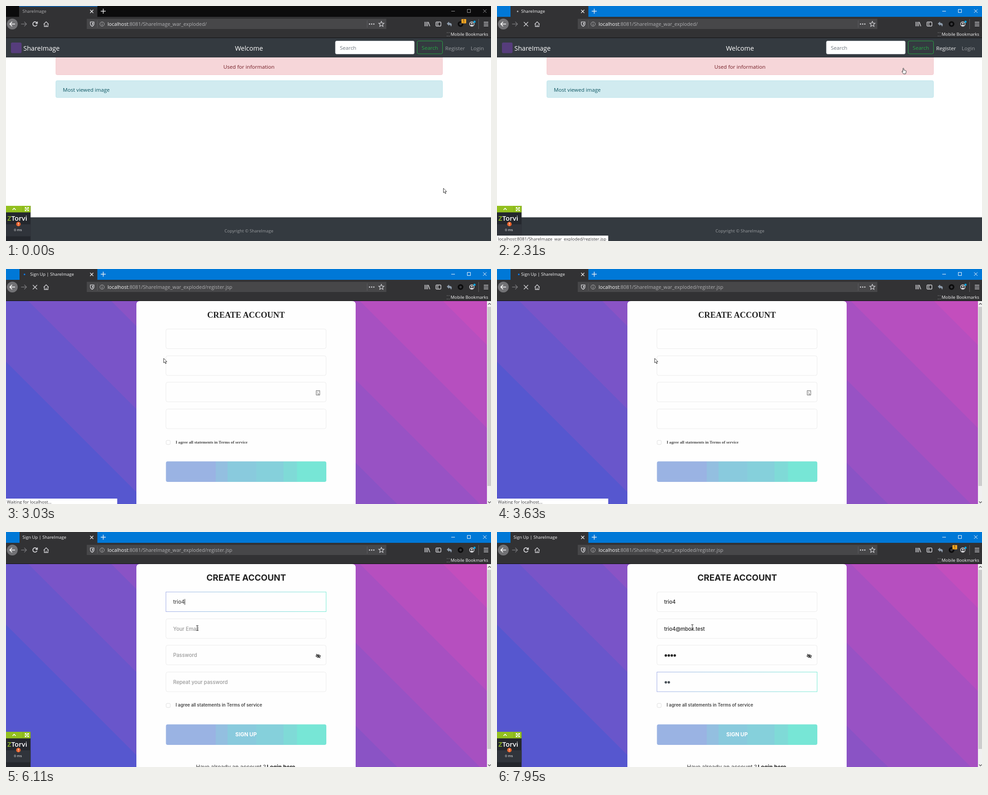
An HTML page that plays this animation: 1075 px wide and 521 px high, repeating every 8000 ms.

```html
<!DOCTYPE html>
<html lang="en">
<head>
<meta charset="utf-8">
<title>Sign-up walkthrough</title>
<style>
html, body { margin: 0; width: 100%; height: 100%; overflow: hidden; background: #fff; }
svg { display: block; }
text { font-family: "Open Sans", "Noto Sans", sans-serif; font-size: 11.6px; white-space: pre; }
.ui { font-size: 9.55px; fill: #f9f9fa; }
.url { font-size: 11px; fill: #b1b1b3; }
.brand { font-size: 14.5px; fill: #fff; }
.link { fill: #9a9da0; }
.lit { fill: #d0d2d3; }
.mid { text-anchor: middle; }
.line { fill: none; stroke: #d7d7db; stroke-width: 1.4; }
.form text { font-family: Inter, sans-serif; font-weight: 500; font-size: 11.3px; fill: #222; }
.form .hint { fill: #999; }
.form .title { font-weight: 700; font-size: 19px; }
.form .terms { font-weight: 600; font-size: 9.7px; fill: #444; }
.form .foot { font-size: 12.3px; fill: #555; }
.form .bold { font-weight: 700; fill: #222; }
.form .go { font-weight: 700; font-size: 11.7px; fill: #fff; }
.plain text { font-family: "Liberation Serif", serif; font-weight: 700; fill: #222; }
</style>
</head>
<body>
<svg width="1075" height="521" viewBox="0 0 1075 521">
  <defs>
    <linearGradient id="sky" gradientUnits="userSpaceOnUse" x1="0" y1="205" x2="551" y2="-346"></linearGradient>
    <linearGradient id="mint" gradientUnits="userSpaceOnUse" x1="355" y1="0" x2="710" y2="0"></linearGradient>
    <linearGradient id="glow" gradientUnits="userSpaceOnUse" x1="355" y1="0" x2="710" y2="0">
      <stop offset="0" stop-color="#9face6"/><stop offset="1" stop-color="#74ebd5"/>
    </linearGradient>
  </defs>

  <!-- Home page -->
  <g data-on="0 3030">
    <rect y="71" width="1075" height="450" fill="#fff"/>
    <rect x="110.5" y="100" width="857" height="52.5" rx="3" fill="#f6d6d9" stroke="#f3cacf"/>
    <rect x="110.5" y="165.5" width="857" height="37.5" rx="3" fill="#d1ebf0" stroke="#bee5eb"/>
    <rect y="71" width="1075" height="43" fill="#343a40"/>
    <rect y="468.5" width="1075" height="53" fill="#343a40"/>
    <rect x="11" y="81" width="23.5" height="23.5" rx="3" fill="#563d7c"/>
    <text class="brand" x="38.5" y="99">ShareImage</text>
    <text class="brand mid" x="538.5" y="99">Welcome</text>
    <rect x="730" y="77.5" width="175" height="29" rx="3" fill="#fff" stroke="#ced4da" stroke-width=".8"/>
    <text x="740" y="97" fill="#6c757d">Search</text>
    <rect x="911.5" y="77.5" width="56" height="28.5" rx="3" fill="none" stroke="#28a745"/>
    <text class="mid" x="939.5" y="97" fill="#28a745">Search</text>
    <text class="link" x="973.5" y="98">Register</text>
    <text class="link" x="1030" y="98">Login</text>
    <text class="lit" x="1030" y="98" data-on="850 1610">Login</text>
    <text class="lit" x="973.5" y="98" data-on="1690 2410">Register</text>
    <text class="mid" x="538.5" y="139" fill="#721c24">Used for information</text>
    <text x="126" y="190" fill="#0c5460">Most viewed image</text>
    <text class="mid" x="538.5" y="502" fill="#9a9da0" style="font-size:9.5px">Copyright © ShareImage</text>
  </g>

  <!-- Sign-up page -->
  <g data-on="3030 8000">
    <rect y="71" width="1066" height="450" fill="url(#sky)"/>
    <path d="M289 521V79q0-8 8-8H767q8 0 8 8V521z" fill="#fefefe"/>
    <rect x="1066" y="71" width="9" height="450" fill="#f0f0f0"/>
    <rect x="1067" y="84" width="8" height="397" fill="#cdcdcd"/>
    <path class="line" d="M1068.5 79l3-3 3 3M1068.5 515.500l3 3 3-3" style="stroke:#555"/>
    <rect x="354.500" y="426.500" width="355.500" height="45.500" rx="4" fill="url(#mint)"/>
    <rect x="355" y="380" width="9" height="9" rx="2" fill="#fff" stroke="#ddd"/>
    <g class="form" id="form"></g>
    <g class="plain" data-on="3030 3930">
      <text class="mid" x="532" y="108" style="font-size:18.4px">CREATE ACCOUNT</text>
      <text x="376" y="386.500" style="font-size:9.2px;fill:#444">I agree all statements in Terms of service</text>
      <path d="M687.500 269.500h8v10h-8zM689.500 272h1.500M692.500 272h1.500M689.500 274h1.500M689.500 277h2M692.500 275.500v2.500h1.500" fill="none" stroke="#666"/>
    </g>
    <g class="form" data-on="3930 8000">
      <text class="title mid" x="532.500" y="108">CREATE ACCOUNT</text>
      <text class="terms" x="376" y="387">I agree all statements in Terms of service</text>
      <text class="go mid" x="532" y="453">SIGN UP</text>
      <text class="foot" x="421" y="525">Have already an account ?</text>
      <text class="foot bold" x="578" y="525">Login here</text>
      <path d="M687 275q5-5.500 10 0q-5 5.500-10 0z" fill="none" stroke="#222" stroke-width="1.300"/>
      <circle cx="692" cy="275" r="1.700" fill="#222"/>
      <path d="M687.500 270.500l9 9" stroke="#222" stroke-width="1.300"/>
    </g>
  </g>

  <!-- Profiler widget -->
  <g data-on="0 3030 4030 8000">
    <rect y="443" width="54.500" height="78" fill="#24272d"/>
    <rect y="443" width="54.500" height="14.500" fill="#93c01f"/>
    <rect y="484" width="54.500" height="26.500" fill="#30343b"/>
    <path d="M37.500 443v14.500" stroke="#7ea51a"/>
    <text class="mid" x="26.500" y="499" fill="#fff" style="font-size:7.8px">0 ms</text>
    <text class="mid" x="18" y="456" fill="#fff" style="font-size:10.500px;font-weight:700" data-on="4030 4230">X</text>
    <g data-on="0 3030 4230 8000">
      <path d="M14.500 452l3.500-3.500 3.500 3.500" fill="none" stroke="#fff" stroke-width="1.600"/>
      <path d="M43 447l6.500 6.500M49.500 447l-6.500 6.500M42.500 449.500v-3h3M47 446.500h3v3M50 451v3h-3M45.500 454h-3v-3" fill="none" stroke="#fff" stroke-width="1.200"/>
      <text x="3" y="476" fill="#fff" style="font-size:15px;font-weight:600"><tspan fill="#93c01f">Z</tspan>Torvi</text>
      <circle cx="27.500" cy="483.500" r="5" fill="#e8622c"/>
      <path d="M27.500 480.500v3.500M27.500 485.300v1.300" stroke="#fff" stroke-width="1.300"/>
    </g>
  </g>

  <!-- Status line -->
  <g data-on="1070 1610 1690 3930">
    <rect y="509" width="246.500" height="12" fill="#fff"/>
    <text class="ui" x="2" y="520" style="fill:#333" id="status"></text>
  </g>

  <!-- Browser frame -->
  <rect width="1075" height="24" fill="#0b0b0c"/>
  <rect width="1075" height="24" fill="#0078d7" data-on="1990 8000"/>
  <rect y="24" width="1075" height="47" fill="#323234"/>
  <rect y="70" width="1075" height="1" fill="#0f0f10"/>
  <rect x="29" width="173.500" height="24.500" fill="#323234"/>
  <rect x="29" width="173.500" height="1.500" fill="#0a6cc8" data-on="0 1990"/>
  <rect x="29" width="1" height="24" fill="#0078d7" data-on="1990 8000"/>
  <text class="ui" id="tab" y="15"></text>
  <circle id="spin" cy="12" r="1.700"/>
  <path class="line" d="M186.500 8.500l7 7M193.500 8.500l-7 7M215.500 6v11M210 11.500h11" style="stroke:#f0f0f2"/>
  <path id="winbtn" fill="none" d="M987 11.500h8M1022.500 7.500h7v7h-7zM1057.500 7.500l7.500 7.500M1065 7.500l-7.500 7.500"/>
  <circle cx="14" cy="40" r="12" fill="#727275"/>
  <path class="line" d="M20 40H9M13.500 35L8.500 40l5 5" style="stroke:#fff;stroke-width:1.700"/>
  <path class="line" d="M33.500 40h11M40.500 35l5 5-5 5" style="stroke:#77777a"/>
  <path class="line" d="M68.500 37.500a4.800 4.800 0 1 0 .3 4M69.500 34.500v4h-4" data-on="0 2090 4830 8000" style="stroke-width:1.800"/>
  <path class="line" id="stop" d="M59.500 35.500l9.500 9.500M69 35.500l-9.500 9.500" data-on="2090 4830"/>
  <path class="line" d="M83.500 40.500l5.500-5.500 5.500 5.500M85 39.500v6h8v-6M89 45.500v-4"/>
  <rect x="179" y="28.500" width="664" height="22.500" fill="#474749"/>
  <path d="M202.500 32v16M800.500 32v16M1047.500 29v22" stroke="#5e5e61"/>
  <path class="line" d="M187 35.500q4 0 4-1 0 1 4 1v4q0 3.500-4 5.500-4-2-4-5.500z"/>
  <path d="M191 37v6q2-1.500 2-3.500V37z" fill="#d7d7db"/>
  <circle class="line" cx="213" cy="40" r="4.800" style="stroke-width:1;stroke:#b1b1b3"/>
  <path d="M213 37v1.300M213 39.500v3.500" stroke="#b1b1b3" stroke-width="1.200"/>
  <text class="url" x="225" y="44"><tspan fill="#f9f9fa">localhost</tspan>:8081/ShareImage_war_exploded/<tspan data-on="3030 8000">register.jsp</tspan></text>
  <path d="M804.500 40h2.500M809.300 40h2.500M814 40h2.500" stroke="#d7d7db" stroke-width="2.500"/>
  <path class="line" d="M832 34l1.700 3.900 4.200.4-3.200 2.800 1 4.200-3.700-2.200-3.700 2.200 1-4.200-3.200-2.800 4.200-.4z" style="stroke-width:1.200"/>
  <path class="line" d="M928.500 35v10M931.500 35v10M934.500 35v10M936 35.500l3.500 9.500"/>
  <rect class="line" x="953" y="35.500" width="11" height="9" rx="1.500"/>
  <path class="line" d="M957.500 36v8.500M954.500 38.500h2M954.500 41h2" style="stroke-width:1"/>
  <path d="M977 39l5-4.500v2.700q6 .3 6 4.300 0 2-2 4.500.5-4-4-4.200v2.200z" fill="#8d9bab"/>
  <circle cx="1007.500" cy="40" r="4.500" fill="#37373a" stroke="#0b0b0c" stroke-width="3.500"/>
  <g data-on="0 2090 7700 8000">
    <rect x="1009.500" y="29" width="10.500" height="9.500" rx="1" fill="#f5a623"/>
    <text class="mid" x="1014.700" y="37" fill="#111" style="font-size:8.500px">1</text>
  </g>
  <circle class="line" cx="1032.500" cy="40" r="5"/>
  <circle cx="1032.500" cy="38.500" r="1.800" fill="#d7d7db"/>
  <path d="M1029 43q3.500-3.500 7 0-3.500 3-7 0z" fill="#d7d7db"/>
  <circle cx="1038.500" cy="35" r="2.400" fill="#00a8e8"/>
  <path class="line" d="M1059 36h10M1059 40h10M1059 44h10"/>
  <path d="M977 59h2M981 59h2M977 66.500h2M981 66.500h2" stroke="#8a8a8d"/>
  <text class="ui" x="985.500" y="65.500">Mobile Bookmarks</text>

  <!-- Pointer -->
  <g id="pointer" stroke-linejoin="round">
    <path data-on="0 850 2410 3930" d="M0 0V10L2.300 8 4 12 5.700 11.200 4 7.500H7.200z" fill="#fff" stroke="#222" stroke-width=".9"/>
    <path data-on="850 2410" d="M2.700 1.300q1-1.300 2 0V5l4 1q1.500.5 1.300 2.300L9.300 11l-.5 2.500H4L1 9.300Q0 7.500 1.300 7.200l1.400 1.300z" fill="#fff" stroke="#222" stroke-width=".9"/>
    <path data-on="3930 8000" d="M-2.500-5.500H2.500M0-5.500V5.500M-2.500 5.500H2.500" fill="none" stroke="#333"/>
  </g>
</svg>

<script>
const LOOP = 8000;
const $ = id => document.getElementById(id);
const make = (tag, attrs, parent) => {
  const el = document.createElementNS("http://www.w3.org/2000/svg", tag);
  for (const k in attrs) el.setAttribute(k, attrs[k]);
  return parent.appendChild(el);
};

// Flat colour bands: each edge ends one colour and starts the next.
function bands(id, colors, edges) {
  edges.forEach((offset, i) => {
    make("stop", { offset, "stop-color": colors[i] }, $(id));
    make("stop", { offset, "stop-color": colors[i + 1] }, $(id));
  });
}
bands("sky", ["#5657cf", "#6956cb", "#7954c8", "#8a53c5", "#9852c4", "#a750c1", "#b64fbf", "#c34ebd"],
  [0, 1, 2, 3, 4, 5, 6].map(i => i / 6));
bands("mint", ["#9ab3e3", "#93bfe0", "#89cadd", "#85d0db", "#7fdad7", "#77e6d6"], [.31, .383, .563, .732, .818]);

// Form fields: focus time, then first key and time per key.
const fields = [
  { y: 133, hint: "Your Username", value: "trio4", focus: 4830, start: 5130, step: 120 },
  { y: 192.5, hint: "Your Email", value: "trio4@mbox.test", focus: 6310, start: 6480, step: 52 },
  { y: 251, hint: "Password", value: "****", secret: true, focus: 7260, start: 7460, step: 40 },
  { y: 310.5, hint: "Repeat your password", value: "**", secret: true, focus: 7640, start: 7900, step: 50 }
];
fields.forEach((f, i) => {
  const g = $("form");
  f.end = i < 3 ? fields[i + 1].focus : LOOP;
  f.box = make("rect", { x: 354.5, y: f.y, width: 355, height: 43.5, fill: "#fefefe" }, g);
  f.text = make("text", { x: 370.5, y: f.y + 26 }, g);
  f.dots = f.secret ? [...f.value].map((_, n) =>
    make("circle", { cx: 374.2 + n * 6.6, cy: f.y + 22.7, r: 2.7 }, g)) : [];
  f.caret = make("rect", { y: f.y + 15.5, width: 1, height: 13, fill: "#222" }, g);
});

function drawField(f, t) {
  const focused = t >= f.focus && t < f.end;
  const keys = Math.max(0, Math.min(f.value.length, Math.floor((t - f.start) / f.step) + 1));
  f.box.setAttribute("stroke", focused ? "url(#glow)" : "#ebebeb");
  f.box.setAttribute("rx", focused ? 0 : 4);
  f.text.setAttribute("class", keys ? "" : "hint");
  f.text.textContent = keys ? (f.secret ? "" : f.value.slice(0, keys)) : t < 3930 ? "" : f.hint;
  f.text.style.fill = keys && focused ? "#444" : "";
  f.dots.forEach((d, n) => {
    d.style.display = n < keys ? "" : "none";
    d.setAttribute("fill", focused ? "#495057" : "#222");
  });
  const last = keys ? f.start + (keys - 1) * f.step : f.focus;
  const blink = focused && !f.secret && (t - last) % 1060 < 530;
  f.caret.style.display = blink ? "" : "none";
  if (blink) f.caret.setAttribute("x", 370.5 + (keys ? f.text.getComputedTextLength() : 0));
}

const path = [
  [0, 969.5, 404], [30, 968, 399], [230, 954, 330], [430, 966, 240], [630, 1003, 150], [750, 1023, 112],
  [850, 1033, 102], [1050, 1037, 99], [1389, 1037, 99], [1490, 1030, 97], [1810, 1000, 96], [2110, 1012, 98],
  [2210, 960, 116], [2310, 897, 137], [2510, 700, 190], [2810, 380, 215], [3030, 349.5, 198], [3730, 349.5, 198],
  [4130, 384, 169], [4530, 430, 158], [5710, 430, 158], [5910, 424, 262], [6110, 424, 213], [6410, 431, 212],
  [7899, 431, 212], [7900, 433, 211], [LOOP, 433, 211]
];

const anchors = [0, 30, 750, 1070, 1390, 2110, 3010, 3030, 4830, 5710, 7900];
function snap(t) {
  const a = anchors.filter(v => v <= t).pop();
  return a + Math.floor((t - a) / 100) * 100;
}

function pointerAt(t) {
  const i = Math.max(1, path.findIndex(p => p[0] > t));
  const [t0, x0, y0] = path[i - 1], [t1, x1, y1] = path[i];
  const k = (t - t0) / (t1 - t0);
  return [x0 + (x1 - x0) * k, y0 + (y1 - y0) * k];
}

const timed = [...document.querySelectorAll("[data-on]")].map(el => [el, el.dataset.on.split(" ").map(Number)]);
const host = "localhost:8081/ShareImage_war_exploded/";

function render(t) {
  for (const [el, on] of timed) {
    el.style.display = on.filter(v => v <= t).length % 2 ? "" : "none";
  }
  const s = snap(t), active = t >= 1990, loading = t >= 2090 && t < 4030;
  const [x, y] = pointerAt(s);
  $("pointer").setAttribute("transform", `translate(${x} ${y})`);
  $("status").textContent = t < 1610 ? host + "login.jsp" : t < 2410 ? host + "register.jsp" : "Waiting for localhost...";
  $("tab").textContent = t < 3030 ? "ShareImage" : "Sign Up | ShareImage";
  $("tab").setAttribute("x", loading ? 53.5 : 36.5);
  $("tab").style.fill = active ? "#f9f9fa" : "#b1b1b3";
  $("winbtn").setAttribute("stroke", active ? "#fff" : "#9a9a9c");
  $("stop").style.stroke = loading ? "" : "#77777a";
  $("spin").style.display = loading ? "" : "none";
  $("spin").setAttribute("cx", 45 - 4 * Math.cos((s - 3030) / 1000 * 2 * Math.PI));
  $("spin").setAttribute("fill", t < 3030 ? "#b1b1b3" : "#0a84ff");
  fields.forEach(f => drawField(f, t));
}

const begin = performance.now();
function tick() {
  render((performance.now() - begin) % LOOP);
  requestAnimationFrame(tick);
}
tick();
</script>
</body>
</html>
```
